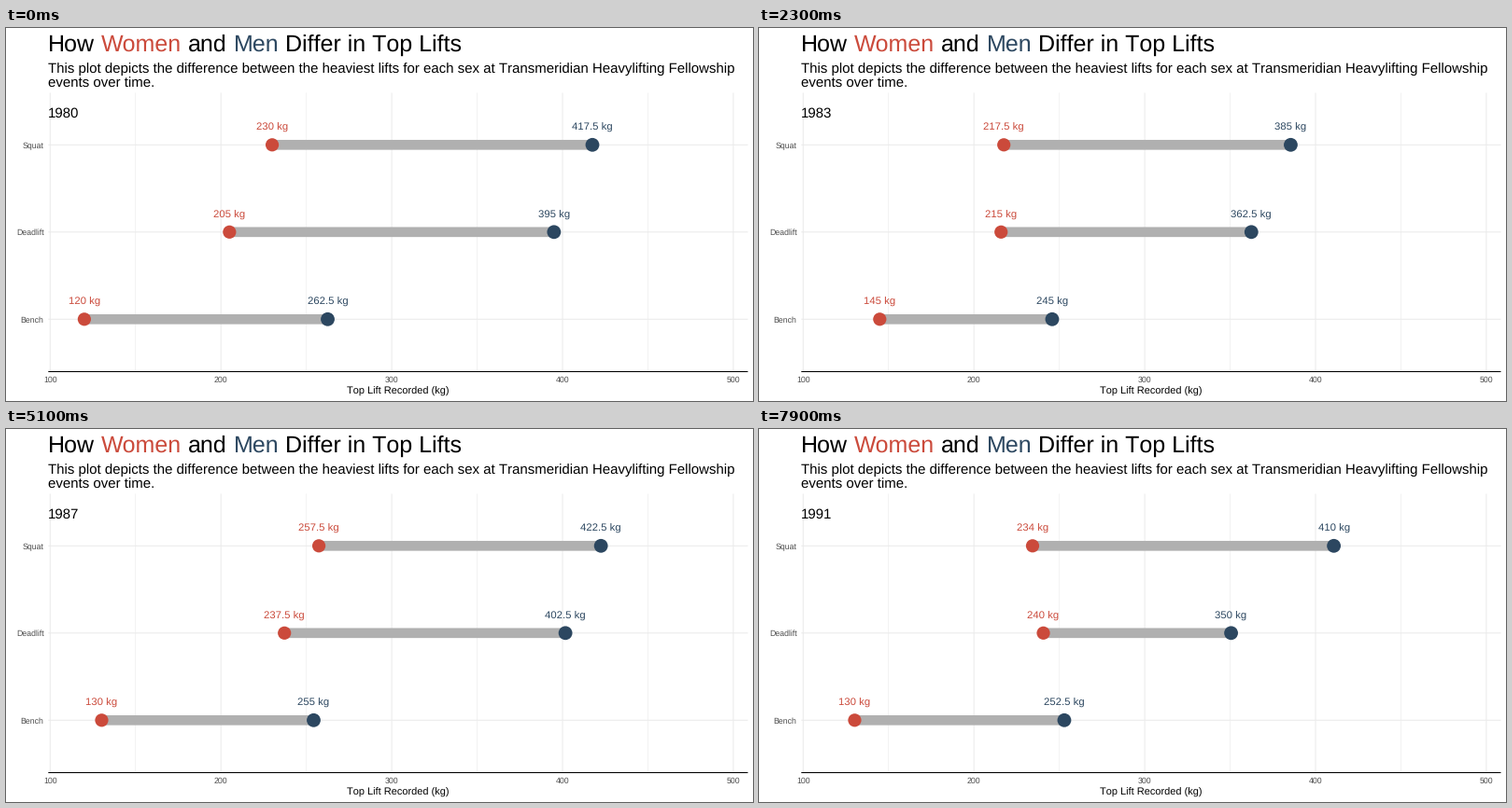
Animation of 800 by 400 pixels, one loop 8000 ms. Source, as a matplotlib script:

```python
import matplotlib.pyplot as plt
from matplotlib.animation import FuncAnimation
from matplotlib.patches import Circle

W, H, DPI = 800, 400, 100
FRAMES, INTERVAL = 80, 100
PX = 72 / DPI  # points per pixel

RED, BLUE, BAR = "#cb4a3b", "#2c4760", "#b0b0b0"
GRID, AXIS_TEXT = "#ebebeb", "#4d4d4d"
LEFT, RIGHT, TOP, BOTTOM = 45.3, 794.5, 69.5, 368.5
ROWS = {"Squat": 125.3, "Deadlift": 218.8, "Bench": 312.3}

FIRST_YEAR = 1980
# Per year: women and men for squat, deadlift, bench
LIFTS = [
    (230, 417.5, 205, 395, 120, 262.5),
    (215, 427.5, 230, 367.5, 150, 245),
    (210, 360, 207.5, 345, 120, 242.5),
    (217.5, 385, 215, 362.5, 145, 245),
    (217.5, 400, 242.5, 360, 140, 270),
    (242.5, 400, 242.5, 362.5, 137.5, 237.5),
    (230, 397.5, 205, 352.5, 117.5, 255),
    (257.5, 422.5, 237.5, 402.5, 130, 255),
    (252.5, 422.5, 227.5, 377.5, 135, 232.5),
    (225, 407.5, 240, 375, 135, 235),
    (232.5, 413, 237.5, 365, 132.5, 242.5),
    (234, 410, 240, 350, 130, 252.5),
    (244, 432.5, 260, 367.5, 135, 265),
]
# Start frame and number of steps of each move to the next year
MOVES = [(0, 6)] + [(8 + 7 * k, 5) for k in range(9)] + [(70, 6), (78, 5)]

plt.rcParams.update({
    "font.family": "Liberation Sans",
    "text.hinting": "none",
    "text.kerning_factor": 6,
})

fig = plt.figure(figsize=(W / DPI, H / DPI), dpi=DPI, facecolor="white")
ax = fig.add_axes([0, 0, 1, 1])
ax.set_xlim(0, W)
ax.set_ylim(H, 0)
ax.axis("off")


def to_x(kg):
    return 47.3 + (kg - 100) * 1.829


def line(xs, ys, color, width, z):
    return ax.plot(xs, ys, color=color, lw=width * PX, zorder=z,
                   solid_capstyle="butt", snap=False)[0]


def text(x, y, s, size, color="black", ha="left"):
    return ax.text(x, y, s, fontsize=size * PX, color=color, ha=ha,
                   va="baseline", zorder=6)


def dot(y, radius, color):
    return ax.add_patch(Circle((0, y), radius, fc=color, ec="none", zorder=5))


def ease(t):
    return 4 * t ** 3 if t < 0.5 else 1 - 4 * (1 - t) ** 3


def draw_static():
    for x, word, color in [(45, "How", "black"), (102, "Women", RED),
                           (195, "and", "black"), (243.7, "Men", BLUE),
                           (299.3, "Differ in Top Lifts", "black")]:
        text(x, 24.5, word, 25, color)
    text(45, 48, "This plot depicts the difference between the heaviest lifts "
         "for each sex at Transmeridian Heavylifting Fellowship", 15)
    text(45, 64, "events over time.", 15)

    for kg in range(100, 501, 50):
        x = to_x(kg)
        major = kg % 100 == 0
        line([x, x], [TOP, BOTTOM], GRID, 1.07 if major else 0.6, 1)
        if major:
            text(x, 380, str(kg), 8.8, AXIS_TEXT, "center")
    for name, y in ROWS.items():
        line([LEFT, RIGHT], [y, y], GRID, 1.07, 1)
        text(40.5, y + 3.5, name, 8.8, AXIS_TEXT, "right")
    line([LEFT, RIGHT], [BOTTOM, BOTTOM], "black", 1.07, 2)
    text((LEFT + RIGHT) / 2, 393, "Top Lift Recorded (kg)", 11, ha="center")


draw_static()
year = text(45, 96, "", 15)
bars = [line([0, 0], [y, y], BAR, 10.67, 4) for y in ROWS.values()]
dots, labels = [], []
for y in ROWS.values():
    for color, radius in [(RED, 7.1), (BLUE, 7.4)]:
        dots.append(dot(y, radius, color))
        labels.append(text(0, y - 15.2, "", 11.38, color, "center"))


def update(frame):
    index = max(i for i, (start, _) in enumerate(MOVES) if start <= frame)
    start, steps = MOVES[index]
    p = ease(min((frame - start) / steps, 1))
    before, after = LIFTS[index], LIFTS[index + 1]
    nearest = index + (p >= 0.5)
    xs = [to_x(a + (b - a) * p) for a, b in zip(before, after)]

    year.set_text(str(FIRST_YEAR + nearest))
    for x, kg, point, label in zip(xs, LIFTS[nearest], dots, labels):
        point.center = (x, point.center[1])
        label.set_x(x)
        label.set_text(f"{kg:g} kg")
    for i, bar in enumerate(bars):
        bar.set_xdata(xs[2 * i:2 * i + 2])
    return [year, *bars, *dots, *labels]


anim = FuncAnimation(fig, update, frames=FRAMES, interval=INTERVAL,
                     repeat=True, repeat_delay=0, blit=False)
plt.show()
```
